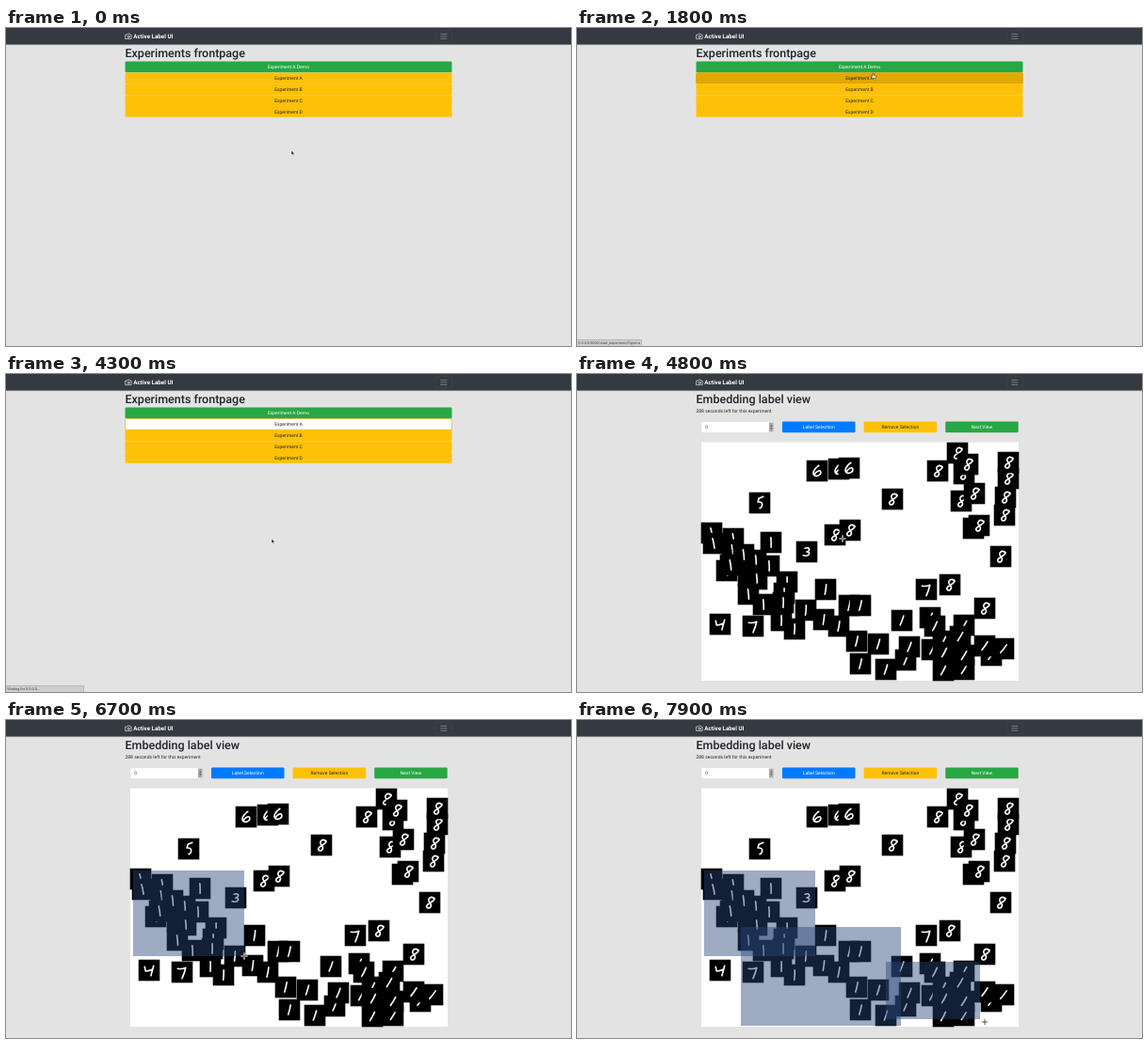
These frames come from a looping animation (600 by 338 pixels, 8 s). An HTML page:

```html
<!DOCTYPE html>
<html lang="en">
<head>
<meta charset="utf-8">
<title>Active Label UI</title>
<style>
html, body { margin: 0; width: 100%; height: 100%; overflow: hidden; background: #e4e3e4; }
svg { display: block; width: 600px; height: 338px; }
text { font: 5px Roboto, "Liberation Sans", sans-serif; fill: #212529; text-rendering: geometricPrecision; }
.mid { text-anchor: middle; }
.light { fill: #fff; }
.title { font-size: 12.5px; font-weight: 500; }
.brand { font-size: 6.25px; font-weight: 700; fill: #fff; }
.small { font-size: 3.9px; fill: #444; }
.line { fill: none; stroke-linecap: round; stroke-linejoin: round; }
</style>
</head>
<body>
<svg id="stage" viewBox="0 0 600 338">
  <rect width="600" height="18.6" fill="#000" opacity=".07"/>
  <rect width="600" height="17.6" fill="#343a40"/>
  <g class="line" stroke="#fff" stroke-width=".6">
    <path d="M127 7.2h1.5l.8-1.1h1.8l.8 1.1h1.2v4.4h-6.1z"/>
    <circle cx="130.1" cy="9.3" r="1.15"/>
  </g>
  <text class="brand" x="135.3" y="11.4">Active Label UI</text>
  <rect x="456.2" y="2.7" width="17.2" height="12.2" rx="1.2" fill="none" stroke="#fff" stroke-opacity=".1" stroke-width=".4"/>
  <path d="M461.3 6.4h7M461.3 8.9h7M461.3 11.4h7" stroke="#fff" stroke-opacity=".5" stroke-width=".65"/>
  <text id="title" class="title" x="126.5" y="30.5"></text>
  <g id="front"></g>
  <g id="view"></g>
  <g id="selections" fill="#284678" fill-opacity=".45"></g>
  <g id="status">
    <rect x="-1" y="331.2" height="8" fill="#cfcecf" stroke="#999" stroke-width=".5"/>
    <text class="small" x="1.3" y="336.1"></text>
  </g>
  <g id="pointer" stroke-linejoin="round">
    <path d="M0 0V5L1.2 4L2 5.8L2.9 5.4L2.1 3.7H3.6Z" fill="#222" stroke="#fff" stroke-width=".5"/>
    <path d="M0 0Q.8 -.4 1 .4V2.1L2.9 2.6Q3.4 2.8 3.3 3.6L2.8 5.5H-.3L-1.9 3.3Q-1.6 2.6 -.7 3L-.2 3.3V.4Z" fill="#fff" stroke="#222" stroke-width=".6"/>
    <g>
      <path d="M-3.5 0h7M0 -3.5v7" stroke="#fff" stroke-width="1.7"/>
      <path d="M-3.2 0h6.4M0 -3.2v6.4" stroke="#333" stroke-width=".8"/>
    </g>
  </g>
</svg>
<script>
const LOOP = 8000, STEP = 100, VIEW_AT = 4700, FOCUS_AT = 1700, CLICK_AT = 2500, WAIT_AT = 3300;
const TOP = 35.6, ROW = 11.87;
const YELLOW = '#ffc107', GREEN = '#28a745';
const $ = id => document.getElementById(id);

function add(parent, tag, attrs, text = '') {
  const el = document.createElementNS('http://www.w3.org/2000/svg', tag);
  for (const key in attrs) el.setAttribute(key, attrs[key]);
  el.textContent = text;
  return parent.appendChild(el);
}

function button(parent, x, y, width, fill, label, light) {
  const rect = add(parent, 'rect', { x, y, width, height: ROW - .15, rx: 1.25, fill });
  add(parent, 'text', { class: 'mid' + (light ? ' light' : ''), x: x + width / 2, y: y + 7.6 }, label);
  return rect;
}

// Front page
const labels = ['Experiment A Demo', ...[...'ABCD'].map(c => 'Experiment ' + c)];
const rows = labels.map((label, i) =>
  button($('front'), 126.5, TOP + i * ROW, 347, i ? YELLOW : GREEN, label, !i));
rows[1].setAttribute('stroke', '#dba90c');
rows[1].setAttribute('stroke-opacity', .6);

// Label view
const view = $('view');
add(view, 'text', { x: 126.5, y: 41.2 }, '288 seconds left for this experiment');
add(view, 'rect', { x: 132, y: 50.7, width: 77, height: 11.6, rx: 1.2, fill: '#fff', stroke: '#ced4da', 'stroke-width': .4 });
add(view, 'text', { x: 136.2, y: 58.3, style: 'fill:#495057' }, '0');
add(view, 'rect', { x: 204, y: 51.5, width: 4.6, height: 10, rx: .6, fill: '#aaa' });
add(view, 'path', { d: 'M205.2 55.8l1.1-1.5l1.1 1.5zM205.2 57.3l1.1 1.5l1.1-1.5z', fill: '#444' });
button(view, 218, 50.5, 77.5, '#007bff', 'Label Selection', true);
button(view, 304.6, 50.5, 77.5, YELLOW, 'Remove Selection');
button(view, 391.2, 50.5, 77.5, GREEN, 'Next View', true);
add(view, 'rect', { x: 132, y: 72.6, width: 337, height: 253.4, fill: '#fff' });

const strokes = {
  1: 'M0 -5.5Q.4 0 0 5.5',
  3: 'M-2 -4C4 -6 4 -1 0 0C5 0 3 6 -4 4',
  4: 'M-5 -4L-4 1Q0 1 4 -1M5 -5L2 6',
  5: 'M4 -7L-1 -5L-2 -1C4 -2 4 4 0 6',
  6: 'M2 -6C-3 -3 -6 3 -3 5S5 4 4 1S-1 1 -3 4',
  7: 'M-5 -4Q0 -3 4 -5Q3 0 0 7',
  8: 'M4 -5C0 -8 -4 -3 0 0S1 8 -2 6S0 1 3 -2S5 -6 2 -6'
};
// Flat x, y pairs of tile centres
const places = {
  1: [143,169, 145,180, 166,175, 165,187, 206,179, 177,192, 159,209, 163,203, 190,198, 204,204,
      182,214, 191,218, 182,234, 223,221, 220,233, 264,229, 198,245, 219,243, 217,262, 231,271,
      243,251, 262,261, 278,268, 289,246, 301,246, 297,284, 320,287, 301,308, 345,262, 375,259,
      380,268, 411,267, 407,279, 328,314, 349,304, 353,290, 377,293, 389,284, 440,299, 389,315,
      411,314, 390,296, 411,299, 433,289, 453,292],
  3: [244,189],
  4: [152,266],
  5: [194,137],
  6: [255,103, 278,101, 289,100],
  7: [371,229, 187,268],
  8: [404,84, 383,103, 411,106, 415,96, 458,111, 458,94, 455,131, 454,150, 408,135, 422,127,
      421,164, 427,161, 450,194, 433,249, 396,224, 335,133, 274,171, 290,166]
};

function tile(digit, x, y) {
  const g = add(view, 'g', { transform: `translate(${x} ${y})` });
  add(g, 'rect', { x: -11.3, y: -11.3, width: 22.6, height: 22.6 });
  // Ones lean further to the right across the map
  const turn = digit == 1 ? -12 + (x - 140) * .16 : digit == 8 ? 8 : 0;
  add(g, 'path', { class: 'line', d: strokes[digit], stroke: '#fff', 'stroke-width': 1.7, transform: `rotate(${turn}) scale(.95)` });
}
for (const digit of [5, 1, 3, 4, 6, 7, 8]) {
  const list = places[digit];
  for (let i = 0; i < list.length; i += 2) tile(digit, list[i], list[i + 1]);
}

// Pointer path: time, x, y
const path = [
  [0, 303, 130], [600, 308, 78], [900, 311, 66], [1600, 314, 48], [2400, 314, 48],
  [2800, 303, 85], [3300, 297, 68], [3700, 288, 61], [3800, 288, 61], [4100, 282, 175],
  [5500, 282, 175], [6000, 135, 160], [6100, 135, 160], [6700, 253, 251], [6900, 174, 220],
  [7300, 344, 325], [7500, 328, 257], [7800, 428, 318], [7900, 433, 321]
];
function pointerAt(t) {
  const i = path.findIndex(p => p[0] >= t);
  if (i < 1) return path[i ? path.length - 1 : 0].slice(1);
  const [t0, x0, y0] = path[i - 1], [t1, x1, y1] = path[i];
  const k = (t - t0) / (t1 - t0);
  return [x0 + (x1 - x0) * k, y0 + (y1 - y0) * k];
}

const drags = [[6100, 6700], [6900, 7300], [7500, 7800]].map(([from, to]) =>
  ({ from, to, start: pointerAt(from), rect: add($('selections'), 'rect', {}) }));

const show = (el, on) => el.style.display = on ? '' : 'none';

function draw(t) {
  const front = t < VIEW_AT;
  const [x, y] = pointerAt(t);
  const row = Math.floor((pointerAt(t - STEP)[1] - TOP) / ROW);
  const hover = front && row > 0 && row < 5 ? row : 0;

  $('title').textContent = front ? 'Experiments frontpage' : 'Embedding label view';
  show($('front'), front);
  show(view, !front);
  rows.forEach((rect, i) => {
    if (i) rect.setAttribute('fill', i == 1 && t >= CLICK_AT ? '#fff' : i == hover ? '#e0a800' : YELLOW);
  });
  rows[1].setAttribute('stroke-width', t >= FOCUS_AT ? 1 : 0);

  const waiting = t >= WAIT_AT;
  const [box, label] = $('status').children;
  show($('status'), front && (hover || waiting));
  box.setAttribute('width', waiting ? 83.5 : 69.5);
  label.textContent = waiting ? 'Waiting for 0.0.0.0...'
    : '0.0.0.0:5000/start_experiment?type=' + ' abcd'[hover];

  for (const { from, to, start, rect } of drags) {
    const end = pointerAt(Math.max(from, Math.min(t, to)));
    rect.setAttribute('x', start[0]);
    rect.setAttribute('y', start[1]);
    rect.setAttribute('width', end[0] - start[0]);
    rect.setAttribute('height', end[1] - start[1]);
  }

  $('pointer').setAttribute('transform', `translate(${x} ${y})`);
  const shape = front ? (hover ? 1 : 0) : 2;
  [...$('pointer').children].forEach((el, i) => show(el, i == shape));
}

const begin = performance.now();
function tick() {
  const t = (performance.now() - begin) % LOOP;
  draw(Math.floor(t / STEP) * STEP);
  requestAnimationFrame(tick);
}
tick();
</script>
</body>
</html>
```
